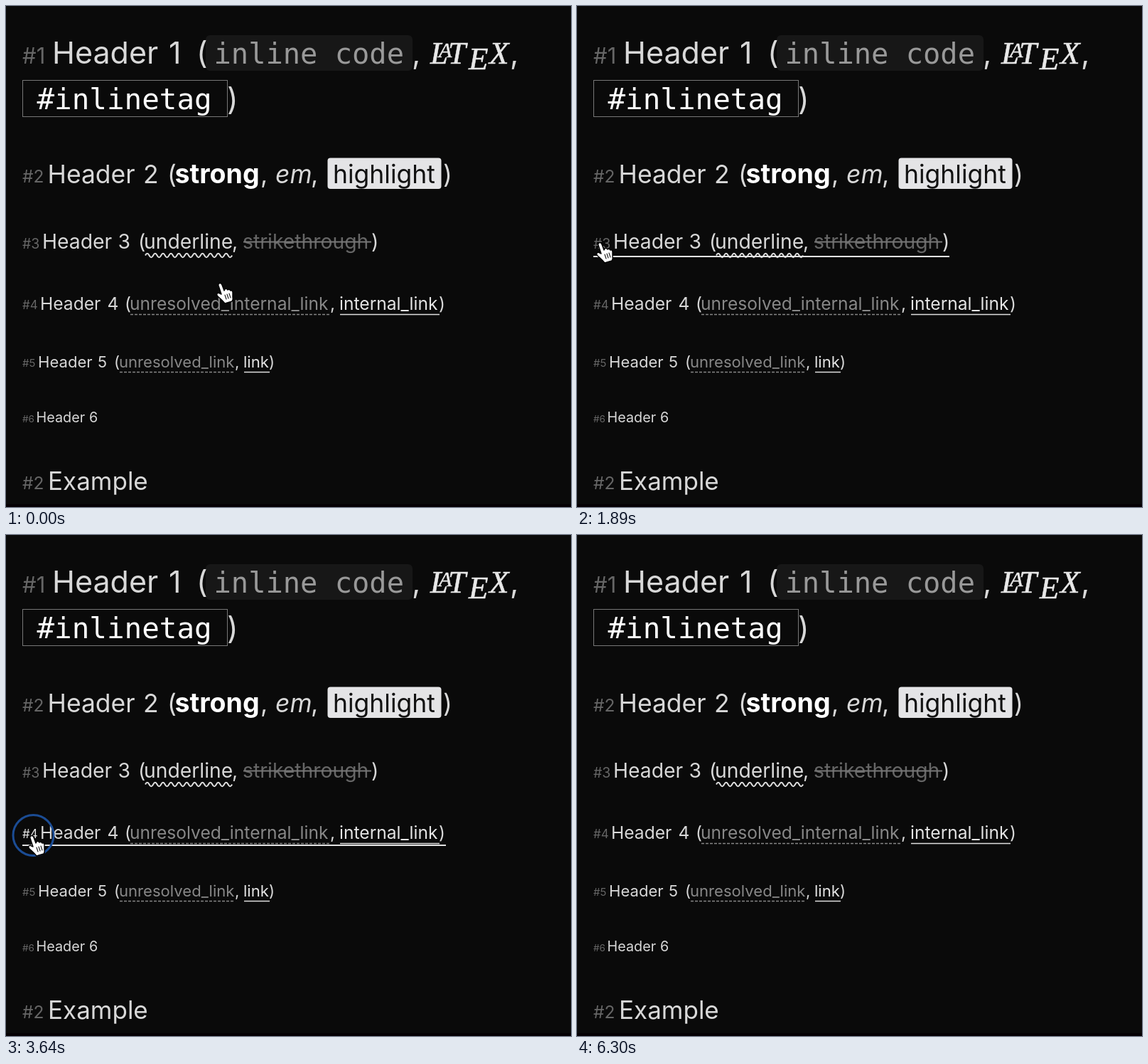
An HTML page that plays this animation: 795 px wide and 704 px high, repeating every 6650 ms.

```html
<!DOCTYPE html>
<html lang="en">
<head>
<meta charset="utf-8">
<title>Header markers</title>
<style>
  html, body { margin: 0; width: 100%; height: 100%; overflow: hidden; background: #0a0a0a; }
  svg { display: block; width: 795px; height: 704px; font-family: Inter, "Noto Sans CJK JP", sans-serif; font-optical-sizing: none; }
  text { fill: #d8d8d8; font-weight: 400; white-space: pre; }
  .mark { fill: #666; }
  .mark.on { fill: #e4e4e4; }
  .mono { font: 40.4px "DejaVu Sans Mono", monospace; }
  .tex { font: italic 45px "Liberation Serif", serif; fill: #e8e8e8; stroke: #e8e8e8; stroke-width: 0.6; }
  .dim { fill: #888; }
  .struck { fill: #666; }
  .link { fill: #e4e4e4; }
  .line { fill: none; stroke: #dedede; stroke-width: 1.5; }
  .dash { stroke: #858585; stroke-dasharray: 4 2; }
</style>
</head>
<body>
<svg viewBox="0 0 795 704">
  <rect width="795" height="704" fill="#0a0a0a"/>
  <rect y="700" width="795" height="4" fill="#050004"/>

  <rect x="281" y="41" width="291" height="50" rx="6" fill="#171717"/>
  <rect x="23.5" y="104.5" width="288" height="51" fill="none" stroke="#777"/>
  <rect x="452.5" y="213.5" width="160" height="43.5" rx="4" fill="#e4e4e6"/>

  <text class="mark" x="23" y="81" font-size="31">#1</text>
  <text y="81" font-size="43"><tspan x="65">Header</tspan><tspan x="229">1</tspan><tspan x="268">(</tspan><tspan x="571">,</tspan><tspan x="709">,</tspan><tspan x="311" y="146">)</tspan></text>
  <text class="mono" x="292.5" y="81" style="fill:#999">inline code</text>
  <text class="mono" x="43.5" y="145" style="fill:#fff;font-size:40.9px">#inlinetag</text>
  <text class="tex" y="81"><tspan x="597">L</tspan><tspan x="609" y="72" style="font-size:30px">A</tspan><tspan x="622" y="81">T</tspan><tspan x="651" y="89">E</tspan><tspan x="680" y="81">X</tspan></text>

  <text class="mark" id="m2" x="23" y="248" font-size="24.5">#2</text>
  <text y="249" font-size="35.5"><tspan x="58.5">Header</tspan><tspan x="193">2</tspan><tspan x="227">(</tspan><tspan x="237.5" font-size="37.5" font-weight="700" fill="#fff">strong</tspan><tspan x="358">,</tspan><tspan x="379" font-style="italic">em</tspan><tspan x="429">,</tspan><tspan x="460" fill="#111">highlight</tspan><tspan x="615">)</tspan></text>

  <text class="mark" id="m3" x="23" y="341" font-size="19.5">#3</text>
  <text y="341" font-size="28.3"><tspan x="51">Header</tspan><tspan x="157.5">3</tspan><tspan x="186">(</tspan><tspan x="194">underline</tspan><tspan x="318">,</tspan><tspan x="333" class="struck">strikethrough</tspan><tspan x="514">)</tspan></text>
  <path class="line" id="wave" style="stroke-width:2"/>
  <path d="M334 331.5H514" stroke="#777" stroke-width="2"/>

  <text class="mark" id="m4" x="23" y="426" font-size="17">#4</text>
  <text y="427" font-size="24.6"><tspan x="48">Header</tspan><tspan x="142.5">4</tspan><tspan x="167">(</tspan><tspan x="174" class="dim">unresolved_internal_link</tspan><tspan x="456">,</tspan><tspan x="469" class="link">internal_link</tspan><tspan x="609">)</tspan></text>
  <path class="line dash" d="M175 433.5H456"/>
  <path class="line" d="M470 433.5H610"/>

  <text class="mark" x="23" y="507" font-size="15">#5</text>
  <text y="508" font-size="22.1"><tspan x="45">Header</tspan><tspan x="129">5</tspan><tspan x="152">(</tspan><tspan x="159" class="dim">unresolved_link</tspan><tspan x="322">,</tspan><tspan x="334" class="link">link</tspan><tspan x="370">)</tspan></text>
  <path class="line dash" d="M160 514.5H322"/>
  <path class="line" d="M335 514.5H371"/>

  <text class="mark" x="23" y="585" font-size="13.5">#6</text>
  <text y="585" font-size="19.8"><tspan x="42.5">Header</tspan><tspan x="117">6</tspan></text>

  <text class="mark" x="23" y="679" font-size="24.5">#2</text>
  <text x="59" y="680" font-size="35">Example</text>

  <path id="hover" stroke="#e2e2e2" stroke-width="2.2"/>
  <circle id="ring" fill="none" stroke="#1b4c94" stroke-width="3"/>
  <g id="hand" stroke-linejoin="round" stroke-linecap="round">
    <path d="M-3 2C-4-2 1-3 2 1L5 9 6 7q2-2 4 1 2-2 4 1 2-1 3 2L17 18Q18 22 16 24L6 27Q3 23-4 17-7 13-3 12L1 14Z" fill="#fff" stroke="#000" stroke-width="1.4"/>
    <path d="M6 15l2 6M9 14l2 6M12 13l2 6" stroke="#222" stroke-width="1.2"/>
  </g>
</svg>
<script>
const LOOP = 6650, STEP = 70;
const $ = id => document.getElementById(id);
const clamp = v => Math.max(0, Math.min(1, v));
const mix = (a, b, p) => a + (b - a) * p;

// Rows: marker id, top, bottom, underline y and right end
const rows = [
  ['m2', 208, 266, 262, 629],
  ['m3', 312, 360, 352, 524],
  ['m4', 400, 442, 436, 619]
];

// Pointer keys: time, x, y
const path = [
  [0, 302, 391], [700, 36, 336], [1050, 33, 333], [1540, 33, 333], [1890, 33, 334],
  [2240, 34, 338], [2940, 34, 338], [3360, 37, 424], [3990, 37, 424],
  [4480, 36, 243], [5740, 36, 244], [6230, -40, 190], [LOOP, -40, 190]
];

// Presses: down and up times
const presses = [[1010, 1260], [1900, 2120], [3400, 3720], [4550, 4800], [5300, 5560]];

function pointer(t) {
  const i = path.findIndex(k => k[0] > t);
  const [t0, x0, y0] = path[i - 1], [t1, x1, y1] = path[i];
  const p = (t - t0) / (t1 - t0), e = p * p * (3 - 2 * p);
  return [mix(x0, x1, e), mix(y0, y1, e)];
}

function pressure(t) {
  return Math.max(...presses.map(([down, up]) =>
    Math.min(clamp((t - down) / 210), clamp((up + 180 - t) / 180))));
}

function draw(now) {
  const t = Math.floor(now % LOOP / STEP) * STEP;
  const [x, y] = pointer(t), press = pressure(t);
  let line = '';
  for (const [id, top, bottom, lineY, right] of rows) {
    const over = x > 15 && x < 62 && y > top && y < bottom;
    if (over) line = `M23 ${lineY}H${right}`;
    $(id).classList.toggle('on', over && press > 0.65);
  }
  $('hover').setAttribute('d', line);
  $('hand').setAttribute('transform', `translate(${x} ${y})`);
  const ring = $('ring');
  ring.setAttribute('cx', x + 1.5);
  ring.setAttribute('cy', y - 2);
  ring.setAttribute('r', mix(21, 28.5, press));
  ring.setAttribute('opacity', press ? mix(0.35, 1, press) : 0);
  requestAnimationFrame(draw);
}

// Squiggle under "underline"
$('wave').setAttribute('d', 'M196 350.5' + 'q2.8-5.5 5.55 0t5.55 0'.repeat(11));
requestAnimationFrame(draw);
</script>
</body>
</html>
```
